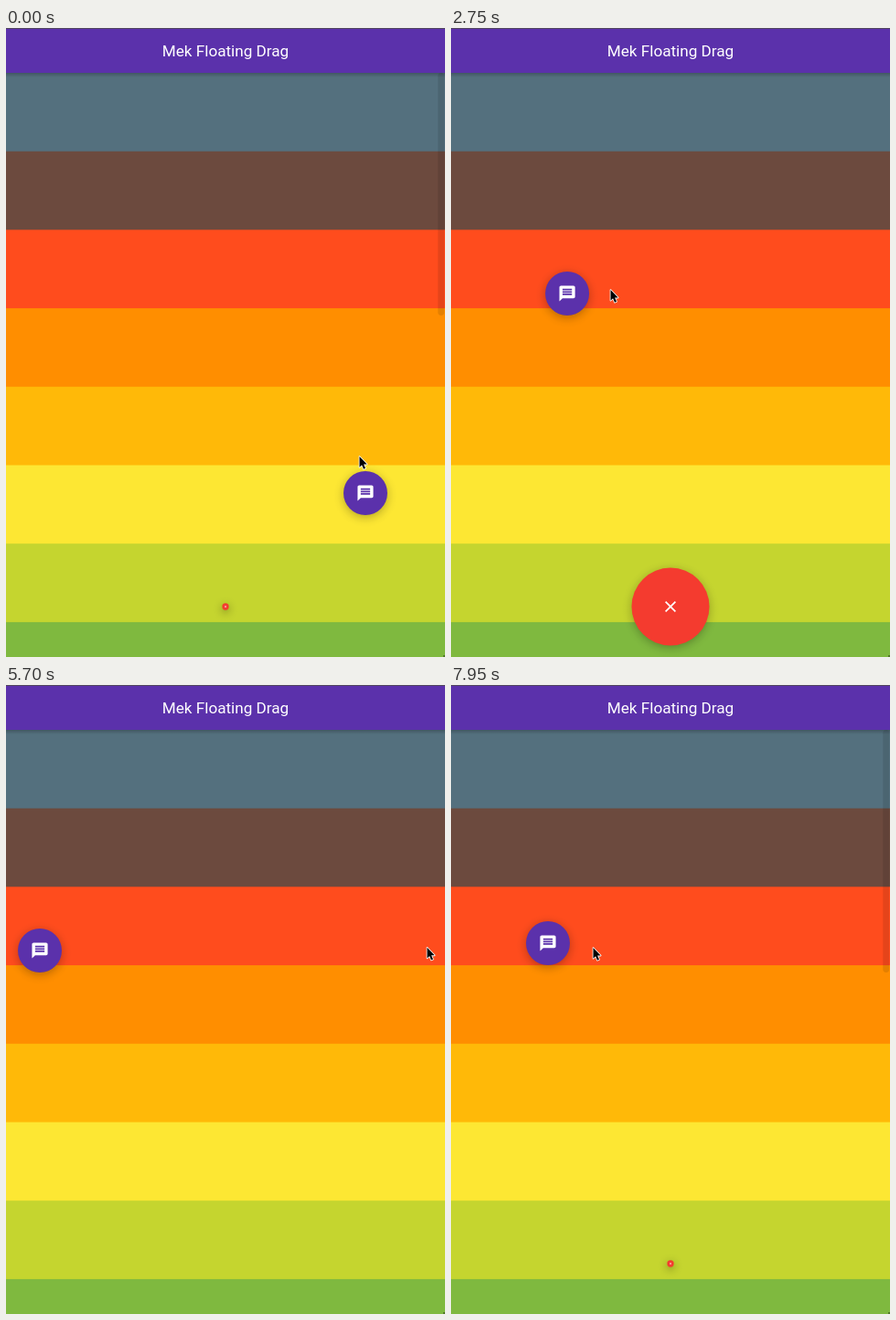
Animation of 480x687 px, one loop 8000 ms. Source, as an HTML page with a canvas:

```html
<!DOCTYPE html>
<html lang="en">
<head>
<meta charset="utf-8">
<title>Floating drag</title>
<style>
  html, body { margin: 0; width: 100%; height: 100%; overflow: hidden; background: #5b31ab; }
  canvas { display: block; width: 480px; height: 687px; }
</style>
</head>
<body>
<canvas id="stage"></canvas>
<script>
const W = 480, H = 687, LOOP = 8000;
const UNIT = 0.857; // stage pixels per logical pixel
const BAR = 49, BAND = 100 * UNIT;
const PURPLE = '#5b31ab', RED = '#f43b2f';
const BANDS = ['#54707e', '#6c4a3e', '#ff4c1d', '#ff8e00', '#ffb908', '#fde733', '#c5d52f', '#7fb93f'];
const FAB_R = 28 * UNIT, BIN_R = 50 * UNIT, BIN_X = W / 2, BIN_Y = 632;
const LEFT = 37, RIGHT = W - LEFT, HIDDEN = -6;
const BIN_GROW = 240, BIN_SHRINK = 310, SNAP = 270;

const canvas = document.getElementById('stage');
const dpr = window.devicePixelRatio || 1;
canvas.width = W * dpr;
canvas.height = H * dpr;
const ctx = canvas.getContext('2d');

const messageIcon = new Path2D('M20 2H4c-1.1 0-1.99.9-1.99 2L2 22l4-4h14c1.1 0 2-.9 2-2V4c0-1.1-.9-2-2-2zm-2 12H6v-2h12v2zm0-3H6V9h12v2zm0-3H6V6h12v2z');
const closeIcon = new Path2D('M19 6.41L17.59 5 12 10.59 6.41 5 5 6.41 10.59 12 5 17.59 6.41 19 12 13.41 17.59 19 19 17.59 13.41 12z');
const arrow = new Path2D('M0 0V11.7L2.6 9.3L4.5 13.7L6.5 12.8L4.6 8.6H8.2Z');

const drags = [
  { grab: -42, release: 540 },
  { grab: 1240, release: 2735 },
  { grab: 7908, release: LOOP }
];

function ease(p) {
  p = Math.min(1, Math.max(0, p));
  return p * p * (3 - 2 * p);
}

// Rises after start, falls after end
function pulse(t, start, end, rise, fall) {
  return ease((t - start) / rise) * (1 - ease((t - end) / fall));
}

function mover(x, y) {
  const moves = [];
  return {
    to(x, y, start, duration) {
      moves.push({ x, y, start, duration });
      return this;
    },
    at(t) {
      let px = x, py = y;
      for (const m of moves) {
        const e = ease((t - m.start) / m.duration);
        px += (m.x - px) * e;
        py += (m.y - py) * e;
      }
      return [px, py];
    }
  };
}

const fab = mover(393, 508)
  .to(368, 364.5, 0, 420)
  .to(RIGHT, 364.5, drags[0].release, SNAP)
  .to(131, 287, 1200, 600)
  .to(128, 290, 1870, 500)
  .to(LEFT, 290, drags[1].release, SNAP)
  .to(HIDDEN, 290, 6200, 250)
  .to(LEFT, 290, 6950, 250)
  .to(106, 282, 7740, 210);

const cursor = mover(386, 468)
  .to(366, 367, 0, 370)
  .to(438, 359, 870, 250)
  .to(126, 281, 1180, 550)
  .to(174, 286, 2620, 130)
  .to(411, 335, 2760, 1240)
  .to(477, 270, 5100, 900)
  .to(30, 282, 6900, 600)
  .to(155, 287, 7680, 270);

function drawIcon(path, x, y, scale) {
  ctx.save();
  ctx.translate(x, y);
  ctx.scale(scale, scale);
  ctx.translate(-12, -12);
  ctx.fillStyle = '#fff';
  ctx.fill(path);
  ctx.restore();
}

function fillCircle(x, y, r, fill) {
  ctx.fillStyle = fill;
  ctx.beginPath();
  ctx.arc(x, y, r, 0, Math.PI * 2);
  ctx.fill();
}

function drawDisc(x, y, r, color) {
  const drop = 2.5, spread = r + 11;
  const strength = 0.3 * Math.min(1, 0.35 + r / 15);
  const shade = ctx.createRadialGradient(x, y + drop, Math.max(0, r - 6), x, y + drop, spread);
  for (let p = 0; p <= 1; p += 0.25) {
    shade.addColorStop(p, `rgba(0,0,0,${strength * (1 - p) ** 2})`);
  }
  fillCircle(x, y + drop, spread, shade);
  fillCircle(x, y, r, color);
}

function drawList() {
  BANDS.forEach((color, i) => {
    ctx.fillStyle = color;
    ctx.fillRect(0, BAR + i * BAND, W, BAND + 1);
  });
  ctx.fillStyle = 'rgba(0,0,0,0.35)';
  ctx.fillRect(478, 685, 2, 2);
}

function drawBar() {
  const shade = ctx.createLinearGradient(0, BAR, 0, BAR + 5);
  shade.addColorStop(0, 'rgba(0,0,0,0.22)');
  shade.addColorStop(1, 'rgba(0,0,0,0)');
  ctx.fillStyle = shade;
  ctx.fillRect(0, BAR, W, 5);
  ctx.fillStyle = PURPLE;
  ctx.fillRect(0, 0, W, BAR);
  ctx.fillStyle = '#51475f';
  ctx.fillRect(0, 0, W, 1);
  ctx.fillStyle = '#fff';
  ctx.font = `${20 * UNIT}px Roboto, sans-serif`;
  ctx.textAlign = 'center';
  ctx.fillText('Mek Floating Drag', W / 2, 31);
}

function drawScrollbar(t) {
  const shown = pulse(t, -400, 380, 150, 270) + pulse(t, 5900, LOOP, 150, 270);
  const hover = pulse(t, 6050, 6950, 150, 200);
  ctx.fillStyle = `rgba(0,0,0,${0.1 * shown + 0.47 * hover})`;
  ctx.beginPath();
  ctx.roundRect(472.3, BAR, 6.9, 265, 3.4);
  ctx.fill();
}

function drawBin(t) {
  // The shadow outlives the disc for a moment
  const drag = drags.find(d => t > d.grab && t < d.release + BIN_SHRINK + 40);
  if (!drag) return;
  const grow = pulse(t, drag.grab, drag.release, BIN_GROW, BIN_SHRINK);
  drawDisc(BIN_X, BIN_Y, BIN_R * grow, RED);
  drawIcon(closeIcon, BIN_X, BIN_Y, UNIT * Math.min(1, grow * 2.4));
}

function drawFab(t) {
  const [x, y] = fab.at(t);
  drawDisc(x, y, FAB_R, PURPLE);
  drawIcon(messageIcon, x, y, UNIT);
}

function drawCursor(t) {
  const [x, y] = cursor.at(t);
  ctx.save();
  ctx.translate(x + 0.5, y);
  ctx.lineJoin = 'round';
  ctx.strokeStyle = '#fff';
  ctx.lineWidth = 1.6;
  ctx.stroke(arrow);
  ctx.fillStyle = '#000';
  ctx.fill(arrow);
  ctx.restore();
}

function draw(t) {
  ctx.setTransform(dpr, 0, 0, dpr, 0, 0);
  drawList();
  drawBar();
  drawScrollbar(t);
  drawBin(t);
  drawFab(t);
  drawCursor(t);
}

const start = performance.now();
function tick() {
  draw((performance.now() - start) % LOOP);
  requestAnimationFrame(tick);
}
tick();
</script>
</body>
</html>
```
